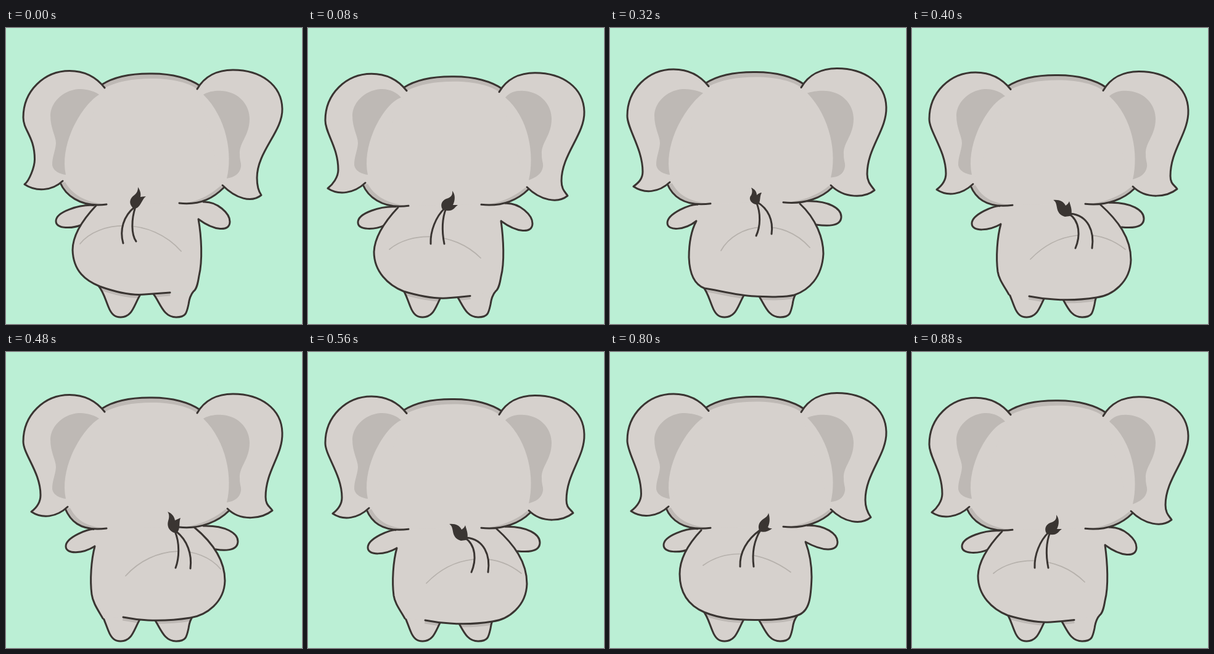
An HTML page that plays this animation: 480x480 px, repeating every 0.96 s.

```html
<!DOCTYPE html>
<html lang="en">
<head>
<meta charset="utf-8">
<title>Dancing elephant</title>
<style>
  html, body { margin: 0; width: 100%; height: 100%; overflow: hidden; background: #bbefd5; }
  svg { display: block; width: 100vw; height: 100vh; }
  path { stroke-linecap: round; stroke-linejoin: round; }
  .skin { fill: #d6d1cd; }
  .line { fill: none; stroke: #3a3532; stroke-width: 3; }
  .both { fill: #d6d1cd; stroke: #3a3532; stroke-width: 3; }
  .shade { fill: #beb9b5; }
  .ink { fill: #3a3532; }
  .crease { fill: none; stroke: #b6b1ac; stroke-width: 1.7; }
  .shadow { fill: none; stroke: #beb9b5; stroke-width: 11; stroke-linecap: butt; }
</style>
</head>
<body>
<svg id="stage" viewBox="0 0 480 480"></svg>
<script>
const STEP = 80, STEPS = 12;

// head: lift, left ear (waist, tip, end), right ear (waist, tip, end)
// arms: left tip and end, right tip and end
const poses = [
  {
    head: '0 46.5 213 30 253.5 92 248 407 243 414 271 351 255',
    arms: '81 313 123 319 363 314 312 310',
    left: 'M146,288 C130,305 108,332 108,360 C109,395 130,410 152,419',
    base: 'M152,419 C180,429 205,434 225,432 C240,431 253,430 266,429',
    right: 'M304,427 C309,424 311,415 313,402 C319,377 317,338 312,310',
    crease: 'M120,350 C150,312 235,306 284,362',
    tailL: 'M190,349 C184,328 190,305 209,290',
    tailR: 'M211,346 C203,335 203,310 210,290',
    tuft: 'M206,292 C198,284 201,276 208,271 C213,267 214,263 214,258 C218,264 219,269 218,274 C220,274 223,273 227,273 C221,277 219,288 212,292'
  },
  {
    head: '4.7 49 230 32 260 93 251 411 248 421 272 355 258',
    arms: '81 315 124 320 364 317 313 313',
    left: 'M146,291 C130,308 108,336 107,363 C107,395 130,417 155,427',
    base: 'M155,427 C185,436 205,439 225,438 C240,437 250,436 263,434.5',
    right: 'M304,427 C309,424 311,415 313,403 C319,380 317,342 313,313',
    crease: 'M132,359 C165,331 235,328 280,373',
    tailL: 'M199,350 C198,330 207,306 222,292',
    tailR: 'M221,350 C217,330 217,310 224,292',
    tuft: 'M218,294 C214,287 217,280 224,277 C231,275 235,272 234,264 C239,270 239,279 235,287 C238,287 240,287 243,287 C238,290 236,298 224,296'
  },
  {
    head: '-1.5 50.5 230 34 258 95 250.5 414 240 423 268 358 255',
    arms: '87 313 128 320 369 308 317 308',
    left: 'M148,289 C130,308 113,332 113,360 C113,395 132,413 153,422',
    base: 'M153,422 C180,433 205,434 235,434.5 C265,435 290,432 304,427',
    right: 'M304,427 C324,421 326,397 327,365 C327,350 325,329 317,308',
    crease: 'M151,346 C190,318 245,322 293,357',
    tailL: 'M211,348 C210,325 222,304 243,289',
    tailR: 'M233,348 C230,325 234,305 244,289',
    tuft: 'M243,291 C239,284 241,277 247,272 C253,268 256,266 257,261 C260,270 259,278 256,284 C258,286 260,286 263,286 C257,291 250,293 243,291'
  },
  null,
  {
    head: '-2.5 53 233 38 257 97 250 417 237 429 263 358 255',
    arms: '93 316 140 313 375 306 334 319',
    left: 'M140,313 C132,328 128,350 128,372 C129,400 137,416 153,422',
    base: 'M153,422 C175,425 205,434 235,435 C262,436 282,437 299,433',
    right: 'M299,433 C322,425 344,405 346,366 C346,342 335,310 308,285',
    crease: 'M180,361 C205,316 280,306 324,356',
    tailL: 'M237,337 C244,322 245,300 237,282',
    tailR: 'M262,334 C265,312 257,293 238,282',
    tuft: 'M236,286 C228,284 224,276 229,271 C231,267 231,263 229,259 C234,261 238,265 238,271 C240,269 243,267 246,267 C242,273 245,282 240,286'
  },
  {
    head: '2.5 55 236 40 262 99 253 419 240 430 261 358 257',
    arms: '97 317 144 318 376 309 340 323',
    left: 'M144,318 C138,340 136,372 139,395 C141,408 149,418 157,432',
    base: 'M190,435 C200,437 212,439 230,440 C255,442 280,440 299,437',
    right: 'M299,437 C325,434 354,412 355,376 C355,340 334,312 305,286',
    crease: 'M192,375 C235,330 300,322 346,359',
    tailL: 'M265,357 C273,338 273,313 254,301',
    tailR: 'M292,357 C296,330 286,304 257,301',
    tuft: 'M248,306 C240,304 236,298 235,291 C234,285 233,281 229,279 C238,278 246,281 249,288 C252,286 254,284 255,281 C257,288 262,300 256,305'
  },
  {
    head: '0 56 232 41 259 100 251 421 235 432 257 359 254',
    arms: '97 315 144 315 376 307 340 320',
    left: 'M144,315 C138,338 136,370 139,393 C141,407 149,418 157,432',
    base: 'M190,430 C200,432 212,434 230,435 C255,436 280,434 299,431',
    right: 'M299,431 C325,427 354,406 355,371 C355,336 334,308 305,284',
    crease: 'M194,363 C240,312 315,312 348,352',
    tailL: 'M275,350 C281,334 282,310 274,291',
    tailR: 'M299,351 C302,328 294,305 276,291',
    tuft: 'M272,293 C263,289 261,281 263,274 C265,268 265,263 262,259 C268,261 273,266 274,273 C277,272 280,270 283,269 C280,276 283,287 278,292'
  }
];

const mix = (a, b) => {
  const nums = b.match(/-?[\d.]+/g);
  let i = 0;
  return a.replace(/-?[\d.]+/g, n => (+n + +nums[i++]) / 2);
};

// The middle of the sway is the top of the bounce.
const middle = {};
for (const key in poses[2]) middle[key] = mix(poses[2][key], poses[4][key]);
middle.head = middle.head.replace(/^\S+/, '-5');
poses[3] = middle;

const stage = document.getElementById('stage');
const NS = 'http://www.w3.org/2000/svg';
const add = (cls, d = '', parent = stage) => {
  const el = document.createElementNS(NS, 'path');
  el.setAttribute('class', cls);
  el.setAttribute('d', d);
  return parent.appendChild(el);
};

const legs = 'M150,418 C158,428 160,437 166,452 C171,465 177,469 186,469 C205,469 207,450 218,432' +
  ' M238,430 C250,444 254,469 276,469 C292,469 293,462 296,448 C297,440 300,432 304,427';
const clip = document.createElementNS(NS, 'clipPath');
clip.id = 'legs';
stage.appendChild(clip);
add('', legs, clip);

add('skin', legs);
const parts = { shadow: add('shadow') };
parts.shadow.setAttribute('clip-path', 'url(#legs)');
add('line', legs);
const layers = {
  arms: 'skin', armLine: 'line', body: 'skin', bodyLine: 'line', crease: 'crease',
  head: 'skin', band: 'shade', headLine: 'line',
  ears: 'both', inner: 'shade',
  tail: 'skin', tailLine: 'line', tuft: 'ink'
};
for (const name in layers) parts[name] = add(layers[name]);

const join = d => d.replace('M', 'L');
const numbers = s => s.split(' ').map(Number);

// The closed area between the two tail lines hides the crease behind it.
function tailArea(p) {
  const pts = p.tailR.match(/[\d.]+,[\d.]+/g).reverse();
  return `${p.tailL} L${pts[0]} C${pts.slice(1).join(' ')} Z`;
}

function shapes(p) {
  const [d, wx, wy, tx, ty, ex, ey, vx, vy, sx, sy, fx, fy] = numbers(p.head);
  const [lx, ly, lex, ley, rx, ry, rex, rey] = numbers(p.arms);
  const low = 286 + d * .5, lowR = 284 + d * .5;

  const top = `M155,${92 + d} C175,${79 + d} 205,${73.5 + d} 237,${74 + d} C270,${74 + d} 298,${82 + d} 315,${94 + d}`;
  const jawR = `M${fx + 2},${fy + 4} C${fx - 13},${fy + 19} 317,${lowR + 4} 281,${lowR}`;
  const jawL = `M163,${low} C118,${low + 6} ${ex + 3},${ey + 20} ${ex - 4},${ey + 3}`;

  const armL = `M142,${low + 1.5} C${lx + 38},${low} ${lx},${ly - 15} ${lx},${ly}` +
    ` C${lx},${ly + 14} ${lx + 28},${ly + 12} ${lex},${ley}`;
  const armR = `M320,${lowR - 2} C${rx - 20},${lowR - 3} ${rx},${ry - 13} ${rx},${ry}` +
    ` C${rx},${ry + 17} ${rx - 25},${ry + 15} ${rex},${rey}`;

  const earL = `M160,${97 + d} C145,${78 + d} 125,${69.5 + d} 103,${69.5 + d} C62,${69.5 + d} 28,${102 + d} 28,${145 + d}` +
    ` C28,${166 + d} ${wx},${wy - 37} ${wx},${wy} C${wx},${wy + 12} ${tx + 8},${ty - 6} ${tx},${ty}` +
    ` C${tx + 18},${ty + 12} ${ex - 18},${ey + 17} ${ex},${ey}`;
  const earR = `M310,${99 + d} C322,${78 + d} 343,${68 + d} 368,${68 + d} C413,${68 + d} 447,${92 + d} 448,${131 + d}` +
    ` C449,${168 + d} ${vx},${vy - 43} ${vx},${vy} C${vx},${vy + 13} ${sx - 5},${sy - 7} ${sx},${sy}` +
    ` C${sx - 16},${sy + 13} ${fx + 22},${fy + 22} ${fx},${fy}`;
  const innerL = `M151,${108 + d} C140,100 125,99 118,99 C90,101 72,123 72,142 C72,163 81,175 81,187` +
    ` C80,200 75,208 75,222 C76,232 88,237 97,238 C92,215 97,190 106,168 C118,140 135,118 151,${108 + d} Z`;
  const innerR = `M320,${108 + d} C328,103 340,101 350,102 C380,104 395,127 395,147 C395,175 378,185 379,205` +
    ` C379,215 382,220 381,225 C379,237 370,242 358,${244 + d * .6} C368,205 358,145 320,${108 + d} Z`;

  return {
    shadow: p.base,
    arms: `${armL} L170,305 L165,280 Z ${armR} L290,305 L300,280 Z`,
    armLine: armL + armR,
    body: `${p.left} ${join(p.base)} ${join(p.right)} L305,270 L155,270 Z`,
    bodyLine: p.left + p.base + p.right,
    crease: p.crease,
    head: `${top} ${join(jawR)} ${join(jawL)} Z`,
    band: `${top} L311,${100 + d} C298,${89 + d} 270,${82 + d} 237,${82 + d} C205,${82 + d} 180,${87 + d} 160,${97 + d} Z` +
      `${jawR} C312,${lowR - 1} ${fx - 20},${fy + 15} ${fx - 3},${fy + 1} Z` +
      `${jawL} L${ex + 4},${ey + 2} C${ex + 14},${ey + 20} 127,${low - 3} 163,${low} Z`,
    headLine: top + jawR + jawL,
    ears: earL + earR,
    inner: innerL + innerR,
    tail: tailArea(p),
    tailLine: p.tailL + p.tailR,
    tuft: p.tuft + ' Z'
  };
}

const drawings = poses.map(shapes);

let shown = -1;
function draw(ms) {
  const step = Math.floor(ms / STEP) % STEPS;
  const pose = step <= 6 ? step : STEPS - step;
  if (pose === shown) return;
  shown = pose;
  for (const name in parts) parts[name].setAttribute('d', drawings[pose][name]);
}

const start = performance.now();
function tick() {
  draw(performance.now() - start);
  requestAnimationFrame(tick);
}
draw(0);
requestAnimationFrame(tick);
</script>
</body>
</html>
```
